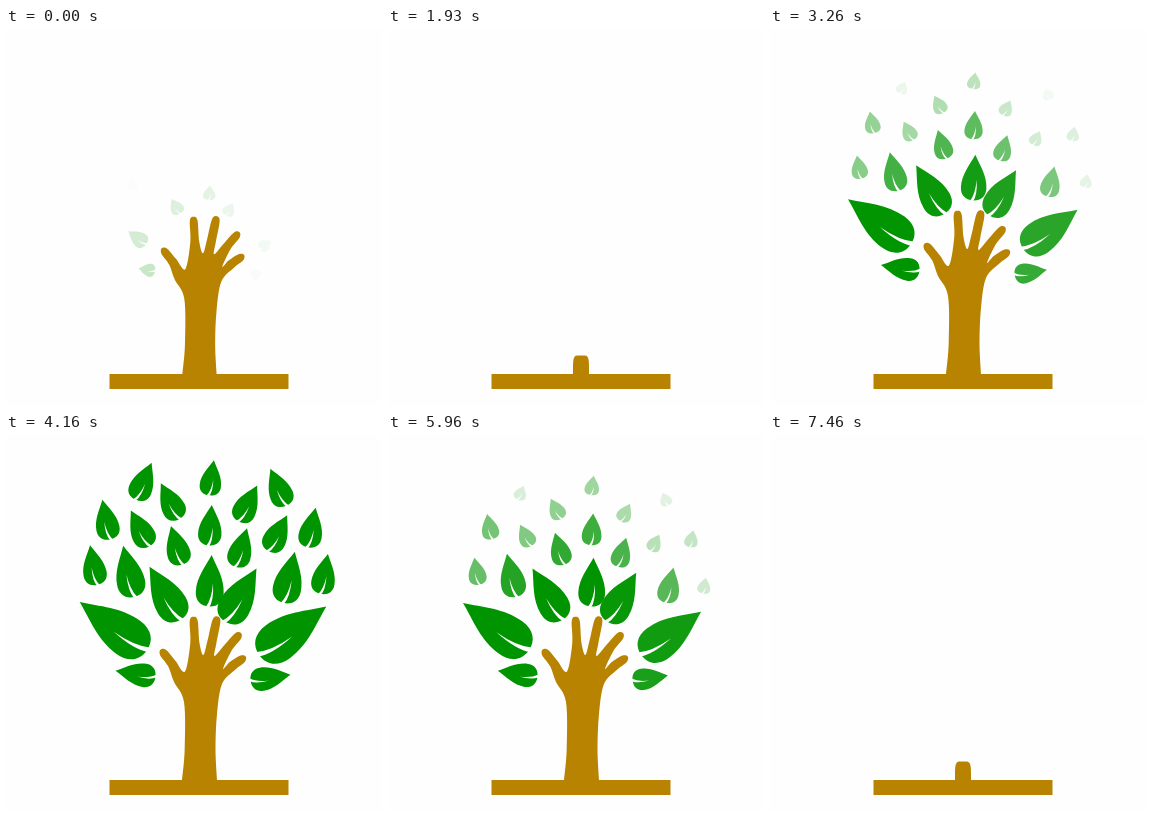
Recreate the animation shown at these times as an HTML page. Size 376 by 378 pixels, loop 7.76 s.

```html
<!DOCTYPE html>
<html lang="en">
<head>
<meta charset="utf-8">
<title>Growing hand tree</title>
<style>
  html, body { margin: 0; width: 100%; height: 100%; overflow: hidden; background: #fefefe; }
  svg { display: block; width: 100%; height: 100%; }
</style>
</head>
<body>
<svg viewBox="0 0 376 378">
  <defs>
    <g id="leaf">
      <path fill="#009400" d="M0-1C.2-.77.5-.55.5-.27C.5-.09.3.01 0 .01C-.3.01-.5-.09-.5-.27C-.5-.55-.2-.77 0-1Z"/>
      <path fill="#fefefe" d="M-.12.03Q.09-.14.1-.45Q.17-.12 0 .04Z"/>
    </g>
  </defs>
  <g id="leaves"></g>
  <path id="hand" fill="#b78300"/>
  <path fill="#b78300" d="M103.5 346H282.5V361H103.5Z"/>
</svg>
<script>
const LOOP = 7760, DURATION = 930, STAGGER = 31;
const CENTRE = 203, LEAN = 0.04;

// Each ring mirrors its side leaves about an axis; leaves stand on their base.
const leafAt = (x, y, tilt, length = 40) => ({ x, y, tilt, length });
const RINGS = [
  { axis: 197, top: leafAt(CENTRE, 172, 3, 51),
    sides: [leafAt(48, 245, 81), leafAt(57, 218.5, 54, 82), leafAt(23, 186.5, 30, 61)] },
  { axis: CENTRE, top: leafAt(CENTRE, 111, 4),
    sides: [leafAt(75, 165.5, 12, 52), leafAt(27, 131.5, 16)] },
  { axis: CENTRE, top: leafAt(CENTRE, 61, 8, 35),
    sides: [leafAt(112, 155, 10), leafAt(99, 109, 11), leafAt(60, 114.5, 27), leafAt(30, 86, 27)] },
  { axis: 205, sides: [leafAt(75, 68.5, -23)] }
];

function ringLeaves({ axis, top, sides }) {
  const place = side => leaf => {
    const x = axis + side * leaf.x;
    return { ...leaf, x, y: leaf.y + LEAN * (x - axis), tilt: side * leaf.tilt };
  };
  return [...sides.map(place(-1)), ...(top ? [top] : []), ...sides.map(place(1)).reverse()];
}

// Five outline points round a digit, given the centre of its tip.
function digit(x, y, degrees, length) {
  const a = degrees * Math.PI / 180;
  const at = (across, up) => [
    x + across * Math.cos(a) + up * Math.sin(a),
    y + across * Math.sin(a) - up * Math.cos(a)
  ];
  return [at(-4.6, -length), at(-4, 0), at(0, 4.2), at(4, 0), at(4.6, -length)];
}

const HAND = [
  [176, 346], [178.7, 315], [178, 268], [168, 248],
  ...digit(157.3, 218.7, -38, 14), [179, 237.5],
  ...digit(187.7, 187, -3, 22), [197.3, 221],
  ...digit(210.5, 186.5, 12, 22), [208.5, 222],
  ...digit(232, 202, 40, 16), [217, 235],
  ...digit(236.3, 225, 55, 12),
  [216, 250], [211, 280], [209.5, 315], [211, 346]
];

// The bud is a rounded block; the hand's points are spread evenly along it.
const BUD = HAND.map((_, i) => {
  const angle = Math.PI * (1 - i / (HAND.length - 1));
  const c = Math.cos(angle), s = Math.max(0, Math.sin(angle));
  return [193 + 8 * Math.sign(c) * Math.abs(c) ** 0.4, 346 - 18.5 * s ** 0.4];
});

const mix = (a, b, p) => a + (b - a) * p;
const ease = u => Math.sin(Math.min(1, Math.max(0, u)) * Math.PI / 2) ** 2;
const level = (t, rise, fall) =>
  Math.min(ease((t - rise) / DURATION), 1 - ease((t - fall) / DURATION));

// Smooth curve through all points.
function spline(points) {
  const point = i => points[Math.min(points.length - 1, Math.max(0, i))];
  const handle = (i, way) =>
    point(i).map((v, k) => v + way * (point(i + 1)[k] - point(i - 1)[k]) / 6);
  return `M${points[0]}` + points.slice(1).map((end, i) =>
    `C${handle(i, 1)} ${handle(i + 1, -1)} ${end}`).join('') + 'Z';
}

const handPath = document.getElementById('hand');
const group = document.getElementById('leaves');
const leaves = RINGS.flatMap(ringLeaves).map(leaf => {
  const node = document.createElementNS('http://www.w3.org/2000/svg', 'use');
  node.setAttribute('href', '#leaf');
  group.append(node);
  return { ...leaf, node, width: Math.sign(leaf.tilt) * (7 + 0.41 * leaf.length) };
});

// The picture moves in steps of 150 ms; the loop opens late in the fall.
function stepTime(t) {
  if (t < 880) return 6560 + 150 * Math.floor((t + 10) / 150);
  if (t < 1930) return 880;
  const start = t < 2960 ? 1930 : 2960;
  return start + 150 * Math.floor((t - start) / 150);
}

function draw(t) {
  leaves.forEach(({ node, x, y, tilt, length, width }, i) => {
    const p = level(t, 2465 + STAGGER * i, 5900 - STAGGER * i);
    node.setAttribute('opacity', Math.min(1, 1.07 * p));
    node.setAttribute('transform', `translate(${x} ${y}) rotate(${tilt}) ` +
      `scale(${mix(11 * Math.sign(width), width, p)} ${mix(11, length, p)})`);
  });
  const p = level(t, 1914, 6440);
  handPath.setAttribute('d', spline(HAND.map((end, i) => end.map((v, k) => mix(BUD[i][k], v, p)))));
}

const begin = performance.now();
function tick() {
  draw(stepTime((performance.now() - begin) % LOOP));
  requestAnimationFrame(tick);
}
tick();
</script>
</body>
</html>
```
